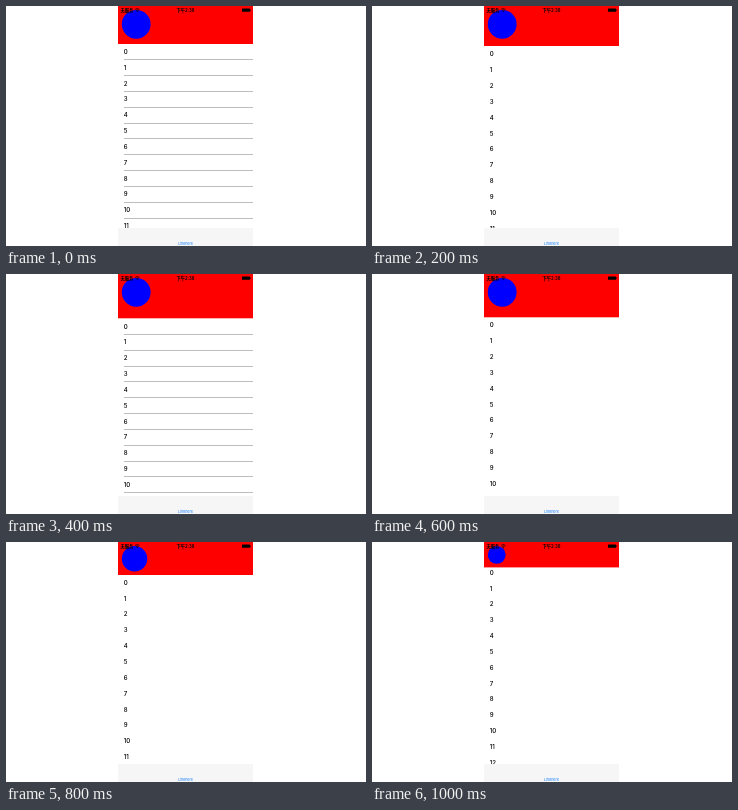
Animation of 360x240 px, one loop 1100 ms. Source, as an HTML page:

```html
<!DOCTYPE html>
<html lang="zh">
<head>
<meta charset="utf-8">
<style>
  html, body { margin: 0; width: 100%; height: 100%; overflow: hidden; background: #fff; }
  svg { display: block; width: 360px; height: 240px; }
  text { font-family: Inter, "Noto Sans CJK SC", "Noto Sans CJK", sans-serif; }
  #rows text { font-size: 6.1px; font-weight: 500; }
  .status { font-size: 4.3px; font-weight: 600; }
</style>
</head>
<body>
<svg viewBox="0 0 360 240">
  <defs><clipPath id="phone"><rect x="112" width="135" height="240"/></clipPath></defs>
  <g clip-path="url(#phone)">
    <g id="rows"></g>
    <g id="lines" fill="#bdbdc0" shape-rendering="crispEdges"></g>
    <rect id="header" x="112" width="135" fill="#f00"/>
    <circle id="avatar" fill="#00f"/>
    <text class="status" x="114.5" y="5.6">无服务</text>
    <g fill="none" stroke="#000" stroke-width=".7">
      <path d="M129 3.4Q131.3 1.6 133.6 3.4M130 4.5Q131.3 3.5 132.6 4.5"/>
      <circle cx="131.3" cy="5.4" r=".3"/>
    </g>
    <text class="status" x="179.5" y="5.6" text-anchor="middle">下午2:38</text>
    <rect x="236" y="2.4" width="8" height="3.4" rx=".6"/>
    <rect x="244.3" y="3.4" width=".7" height="1.4"/>
    <rect x="112" y="222" width="135" height="18" fill="#f6f6f6"/>
    <text x="179.5" y="238.5" text-anchor="middle" font-size="3.7" fill="#107cff">Linkhere</text>
  </g>
</svg>
<script>
const STEP = 100, PITCH = 15.84, ROWS = 14;
// [header height, top of the list, separators shown]
const steps = [
  [38, 37.8, 1], [39, 39, 0], [40, 40.3, 0], [42, 42, 0],
  [44.3, 44.5, 1], [44, 44.2, 0], [43.3, 43.3, 0], [39, 38.8, 0],
  [33, 32.7, 0], [28, 27.3, 0], [25.4, 22.6, 0]
];
const $ = id => document.getElementById(id);

function add(parent, tag, attrs, label = '') {
  const el = document.createElementNS('http://www.w3.org/2000/svg', tag);
  for (const key in attrs) el.setAttribute(key, attrs[key]);
  el.textContent = label;
  parent.append(el);
  return el;
}

const rows = $('rows'), lines = $('lines'), header = $('header'), avatar = $('avatar');
const seps = [];
for (let i = 0; i < ROWS; i++) {
  add(rows, 'text', { x: 117.7, y: i * PITCH + 10.1 }, i);
  seps.push(add(lines, 'rect', { x: 118, width: 129, height: 1 }));
}

function draw(index) {
  const [height, top, ruled] = steps[index];
  header.setAttribute('height', height);
  rows.setAttribute('transform', `translate(0 ${top})`);
  lines.style.display = ruled ? '' : 'none';
  seps.forEach((sep, i) => sep.setAttribute('y', Math.floor(top + (i + 1) * PITCH)));
  // The disc keeps its corner and shrinks with a short header.
  const r = Math.min(28.8, height - 7.5) / 2;
  avatar.setAttribute('r', r);
  avatar.setAttribute('cx', 115.8 + r);
  avatar.setAttribute('cy', 3.9 + r);
}

let start;
function tick(now) {
  start ??= now;
  draw(Math.floor((now - start) / STEP) % steps.length);
  requestAnimationFrame(tick);
}
draw(0);
requestAnimationFrame(tick);
</script>
</body>
</html>
```
